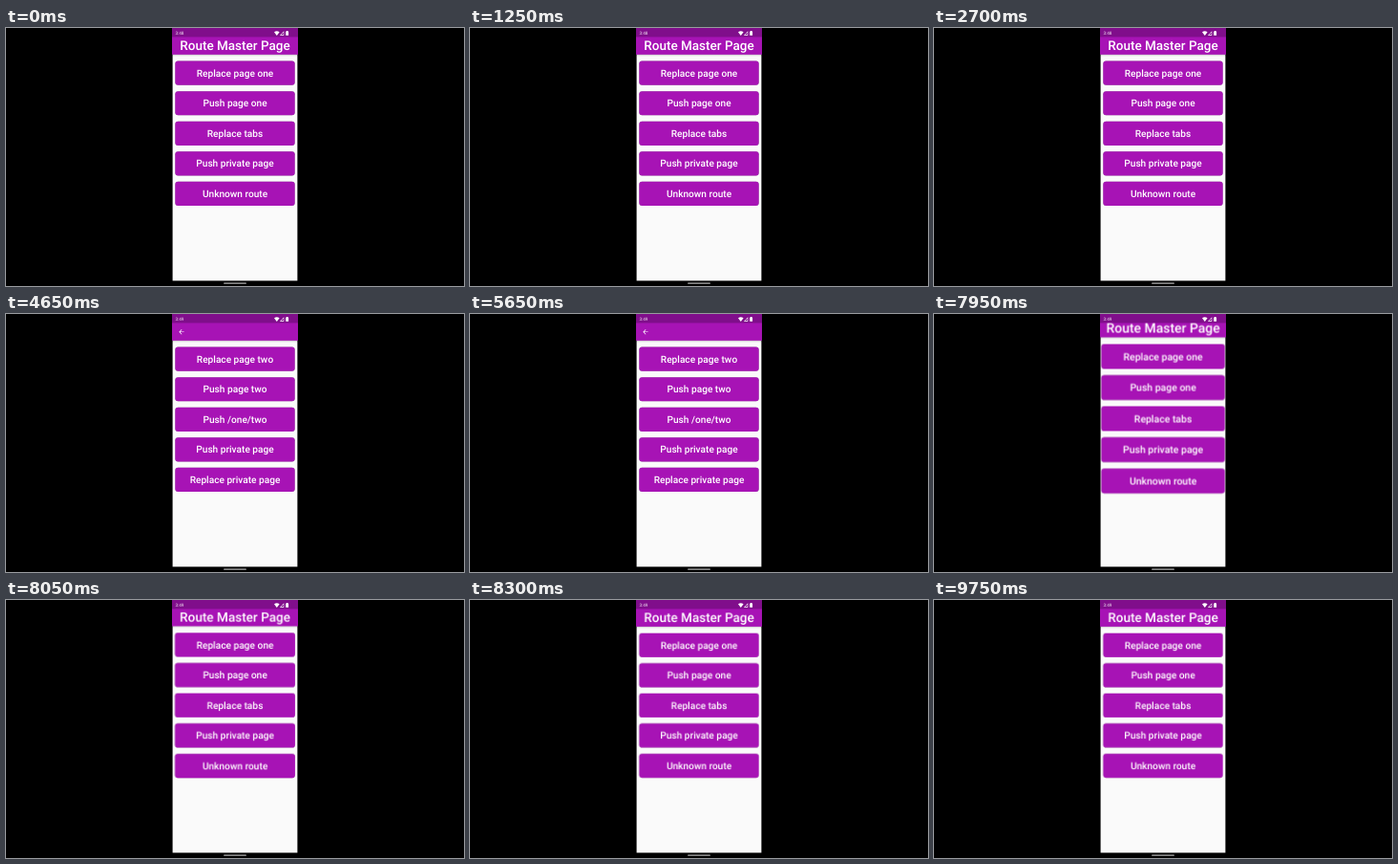
An HTML page that plays this animation: 480x270 px, repeating every 9800 ms.

```html
<!DOCTYPE html>
<html lang="en">
<head>
<meta charset="utf-8">
<title>Page routing demo</title>
<style>
  html, body { margin: 0; width: 100%; height: 100%; overflow: hidden; background: #000; }
  svg { display: block; width: 480px; height: 270px; }
  text { font-family: Roboto, sans-serif; text-rendering: geometricPrecision; }
  .bar, .button rect { fill: #a713b5; }
  .bar { filter: drop-shadow(0 .7px .8px #0006); }
  .button rect { filter: drop-shadow(0 .6px .6px #0005); }
  .button text, .title { fill: #fff; font-weight: 500; text-anchor: middle; }
  .button text { font-size: 10.15px; }
  .title { font-size: 13.5px; }
  .body { fill: #212121; font-size: 8.2px; }
  .clock { fill: #fff; fill-opacity: .88; font-size: 4.7px; }
  #master { transform-origin: 240px 135px; }
</style>
</head>
<body>
<svg viewBox="0 0 480 270">
  <defs>
    <clipPath id="screen"><rect x="174.6" width="130.8" height="264.6"/></clipPath>
    <path id="back" fill="#fff" transform="translate(180 14.8) scale(.33)"
      d="M20 11H7.83l5.59-5.59L12 4l-8 8 8 8 1.41-1.41L7.83 13H20z"/>
    <rect id="bar" class="bar" x="170" y="-4" width="140" height="31.8"/>
  </defs>

  <g clip-path="url(#screen)">
    <rect x="174" width="132" height="265" fill="#fafafa"/>
    <g id="master">
      <use href="#bar"/>
      <text class="title" x="240" y="23.4">Route Master Page</text>
    </g>
    <g id="one">
      <use href="#bar"/>
      <use href="#back"/>
    </g>
    <g id="two">
      <use href="#bar"/>
      <use href="#back"/>
      <text class="body" x="174.8" y="35.5">Page Two</text>
    </g>

    <rect x="174" width="132" height="9.4" fill="#000" fill-opacity=".23"/>
    <text id="early" class="clock" x="177.4" y="7.3">3:48</text>
    <text id="late" class="clock" x="177.4" y="7.3">3:49</text>
    <g fill="#fff">
      <path d="M281 4.3Q283.8 2.3 286.6 4.3L283.8 7.9z"/>
      <path d="M291.3 3.2V7.7H286.9zM290.7 4.6L288.3 7.1H290.7z" fill-rule="evenodd"/>
      <path d="M294 3.1h1.3v.5h.8v4.2h-2.9v-4.2h.8z"/>
    </g>
  </g>
  <rect x="228" y="266.4" width="24" height="1.4" rx=".7" fill="#b4b4b4"/>
</svg>

<script>
const LOOP = 9800;
const byId = id => document.getElementById(id);

function add(parent, tag, attrs) {
  const el = document.createElementNS("http://www.w3.org/2000/svg", tag);
  for (const key in attrs) el.setAttribute(key, attrs[key]);
  return parent.appendChild(el);
}

function addButtons(page, labels) {
  labels.forEach((label, i) => {
    const y = 34.6 + i * 31.55;
    const group = add(page, "g", { class: "button" });
    add(group, "rect", { x: 177.3, y, width: 125.4, height: 25.2, rx: 3 });
    add(group, "text", { x: 240, y: y + 16.1 }).textContent = label;
  });
}

// steps: [time in ms, value], each held until the next
function play(el, prop, steps) {
  const frames = steps.map(([time, value]) =>
    ({ offset: time / LOOP, [prop]: value, easing: "step-end" }));
  frames.push({ offset: 1, [prop]: steps[steps.length - 1][1] });
  el.animate(frames, { duration: LOOP, iterations: Infinity });
}

addButtons(byId("master"), ["Replace page one", "Push page one", "Replace tabs",
  "Push private page", "Unknown route"]);
addButtons(byId("one"), ["Replace page two", "Push page two", "Push /one/two",
  "Push private page", "Replace private page"]);

const OPEN_ONE = 4050, OPEN_TWO = 5800, GO_HOME = 7950;

play(byId("master"), "opacity", [[0, 1], [OPEN_ONE, 0], [GO_HOME, 1]]);
play(byId("one"), "opacity", [[0, 0], [OPEN_ONE, 1], [OPEN_TWO, 0]]);
play(byId("two"), "opacity", [[0, 0], [OPEN_TWO, 1], [GO_HOME, 0]]);
play(byId("early"), "opacity", [[0, 1], [OPEN_ONE, 0]]);
play(byId("late"), "opacity", [[0, 0], [OPEN_ONE, 1]]);

// the home page settles from a slight zoom
const zoom = [1.032, 1.01, 1.004, 1.001, 1];
play(byId("master"), "transform", [[0, "scale(1)"],
  ...zoom.map((s, i) => [GO_HOME + i * 50, `scale(${s})`])]);
</script>
</body>
</html>
```
